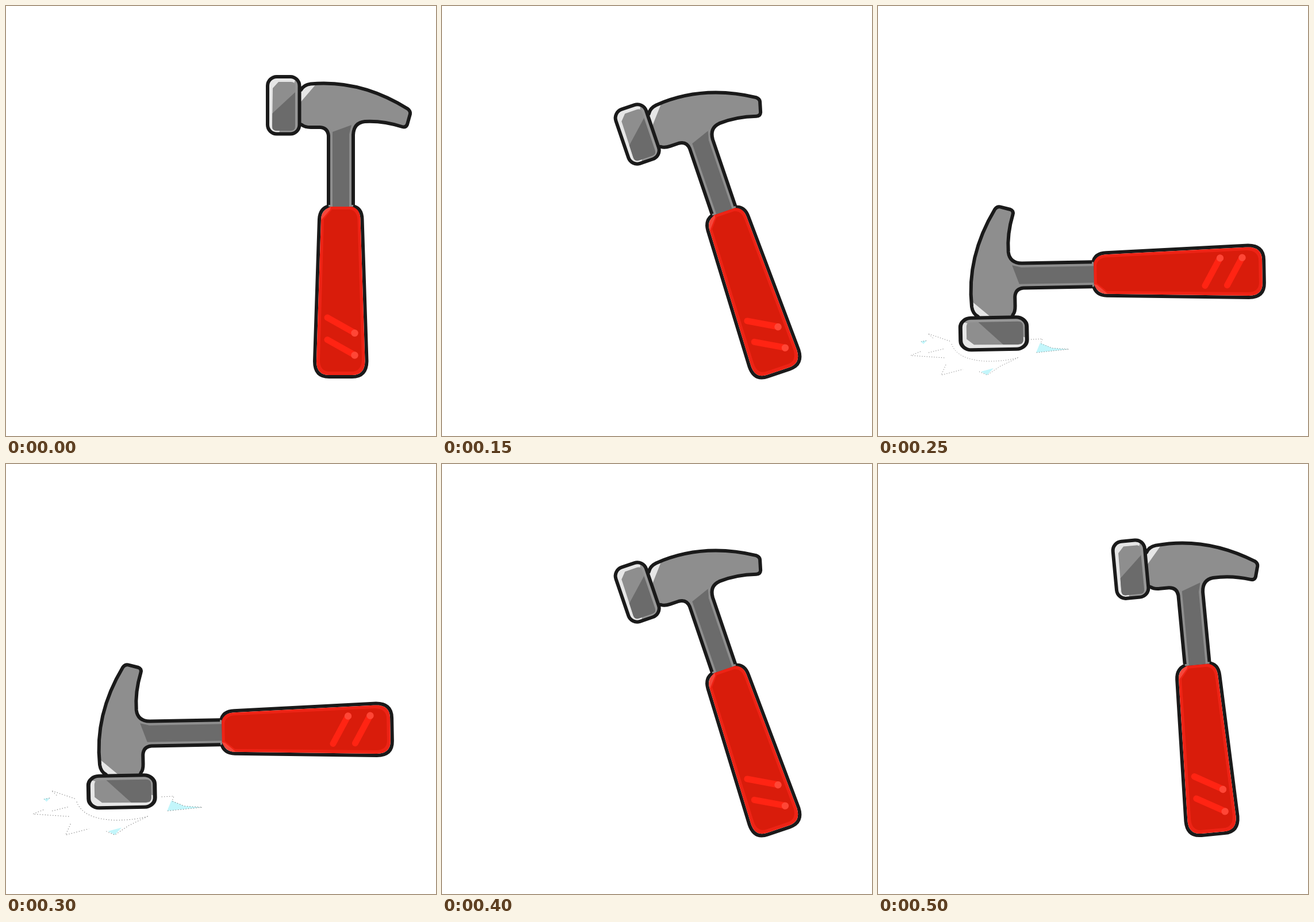
Animation of 748 by 748 pixels, one loop 550 ms. Source, as an HTML page with a canvas:

```html
<!DOCTYPE html>
<html>
<head>
<meta charset="utf-8">
<style>
  html, body { margin: 0; width: 100%; height: 100%; overflow: hidden; background: #fff; }
  canvas { display: block; }
</style>
</head>
<body>
<canvas id="stage" width="748" height="748"></canvas>
<script>
const ctx = document.getElementById('stage').getContext('2d');
const STEP = 50;
const INK = '#1a1a1a', STEEL = '#8e8e8e', DARK = '#6b6b6b', SHINE = '#e6e6e6';

// Pivot on the handle, and where each pose puts it: x, y, swing in degrees.
const PIVOT = [607, 569];
const POSES = [
  [607, 569, 0],
  [600.5, 566, 5.4],
  [597, 563, 9.4],
  [585, 558, 18.8],
  [616, 483, 56.5],
  [595, 438, 91.1]
];
const SEQUENCE = [0, 1, 2, 3, 4, 5, 5, 4, 3, 2, 1];
const IMPACT = 5;

const BODY = new Path2D(`M508 149 L513 146 Q518 137 530 135.5 C592 130 648 147 699 179
  Q704 183 703 188 L698 206 Q695.500 212 689 210 C664 202 642 200 624 201
  Q605 203 604 224 V349 H561 V226 Q560 212 546 211 H530 Q520 211 515 207 L508 204`);
const BODY_EDGE = new Path2D(`M508 149 L513 146 Q518 137 530 135.5 C592 130 648 147 699 179
  Q704 183 703 188 L698 206 Q695.500 212 689 210 C664 202 642 200 624 201
  Q605 203 604 224 V346 M561 346 V226 Q560 212 546 211 H530 Q520 211 515 207 L508 204`);
const HANDLE = new Path2D(`M562 348 H603 Q619 351 619.5 371 L627.500 618 Q627 645 602 645
  H562 Q537 645 537 618 L545 371 Q546 352 562 348 Z`);
const GRIP = new Path2D(`M565 349 H602 Q616 353 616.500 371 L624.500 618 Q624 642 602 642
  H562 Q540 642 540 618 L548 371 Q549 355 565 349 Z`);
const GRIP_PANEL = new Path2D(`M567 354 H599 Q611 357 611.500 372 L619 616 Q618 636 601 636
  H563 Q546 636 546 616 L553 371 Z`);
const HEAD_PANEL = new Path2D(`M474 132 H496 Q503 132 503 139 V209 Q503 217 495 217
  H471 Q463 217 463 209 L464 143 Z`);

function polygon(color, ...points) {
  ctx.beginPath();
  points.forEach(([x, y]) => ctx.lineTo(x, y));
  ctx.closePath();
  ctx.fillStyle = color;
  ctx.fill();
}

function fill(path, color) {
  ctx.fillStyle = color;
  ctx.fill(path);
}

function outline(path, width = 6) {
  ctx.strokeStyle = INK;
  ctx.lineWidth = width;
  ctx.stroke(path);
}

function clipped(path, draw) {
  ctx.save();
  ctx.clip(path);
  draw();
  ctx.restore();
}

function drawHandle() {
  fill(GRIP, '#ee2315');
  clipped(GRIP, () => polygon('#f7463a', [546, 375], [546, 346], [566, 346], [564, 354], [552, 368]));
  fill(GRIP_PANEL, '#d91c0b');
  for (const y of [569, 607.5]) {
    ctx.lineCap = 'round';
    ctx.lineWidth = 11;
    ctx.strokeStyle = '#ff2413';
    ctx.beginPath();
    ctx.moveTo(559, y - 27);
    ctx.lineTo(607, y);
    ctx.stroke();
    ctx.fillStyle = '#ff4636';
    ctx.beginPath();
    ctx.arc(606.5, y, 6.2, 0, 7);
    ctx.fill();
  }
}

function drawBody() {
  fill(BODY, STEEL);
  polygon(DARK, [568, 219], [601, 207], [597, 223], [597, 349], [568, 349]);
  clipped(BODY, () => polygon(SHINE, [508, 146], [523, 134], [541, 134], [511, 169]));
  outline(BODY_EDGE);
}

function drawHead(stretch) {
  ctx.save();
  ctx.translate(482.5, 172.5);
  ctx.scale(1, stretch);
  ctx.translate(-482.5, -172.5);
  const block = new Path2D();
  block.roundRect(455, 123, 55.5, 99.5, 16);
  fill(block, '#979797');
  clipped(block, () => polygon(SHINE, [450, 118], [507, 118], [499, 140], [474, 224], [450, 224]));
  fill(HEAD_PANEL, STEEL);
  clipped(HEAD_PANEL, () => polygon(DARK, [463, 187], [504, 149], [504, 218], [462, 218]));
  outline(block);
  ctx.restore();
}

function drawHammer(pose, stretch) {
  const [x, y, swing] = pose;
  ctx.save();
  ctx.translate(x, y);
  ctx.rotate(-swing * Math.PI / 180);
  ctx.translate(-PIVOT[0], -PIVOT[1]);
  ctx.lineJoin = 'round';
  ctx.lineCap = 'butt';
  outline(HANDLE);
  drawBody();
  drawHandle();
  drawHead(stretch);
  ctx.restore();
}

const CRACKS = new Path2D(`M125 583 L87 570 L96 578 M84 582 L75 584
  M74 601 L57 608 L116 612 M118 624 L110 642 L148 632 M128 588 Q138 616 190 618 Q225 618 245 611
  M176 636 L190 642 L212 627 L243 612 M266 580 L286 579 L283 587 L303 595 L332 597 L275 603
  M88 603 L116 596`);

function drawShards(spread) {
  ctx.save();
  ctx.translate(200, 595);
  ctx.scale(spread, spread);
  ctx.translate(-200, -595);
  const ice = '#c3f6fb';
  polygon(ice, [74, 583], [85, 582], [79, 588]);
  polygon(ice, [179, 636], [201, 630], [190, 642]);
  polygon(ice, [282, 586], [303, 595], [332, 597], [275, 603]);
  ctx.strokeStyle = '#777';
  ctx.lineWidth = 1;
  ctx.lineCap = 'butt';
  ctx.setLineDash([1.2, 3]);
  ctx.stroke(CRACKS);
  ctx.restore();
}

function render(now) {
  const step = Math.floor(now / STEP) % SEQUENCE.length;
  const pose = SEQUENCE[step];
  const hit = pose === IMPACT;
  ctx.fillStyle = '#fff';
  ctx.fillRect(0, 0, 748, 748);
  if (hit) drawShards(step === IMPACT ? 1 : 1.07);
  drawHammer(POSES[pose], hit ? 1.16 : 1);
}

const start = performance.now();
function tick() {
  render(performance.now() - start);
  requestAnimationFrame(tick);
}
tick();
</script>
</body>
</html>
```
